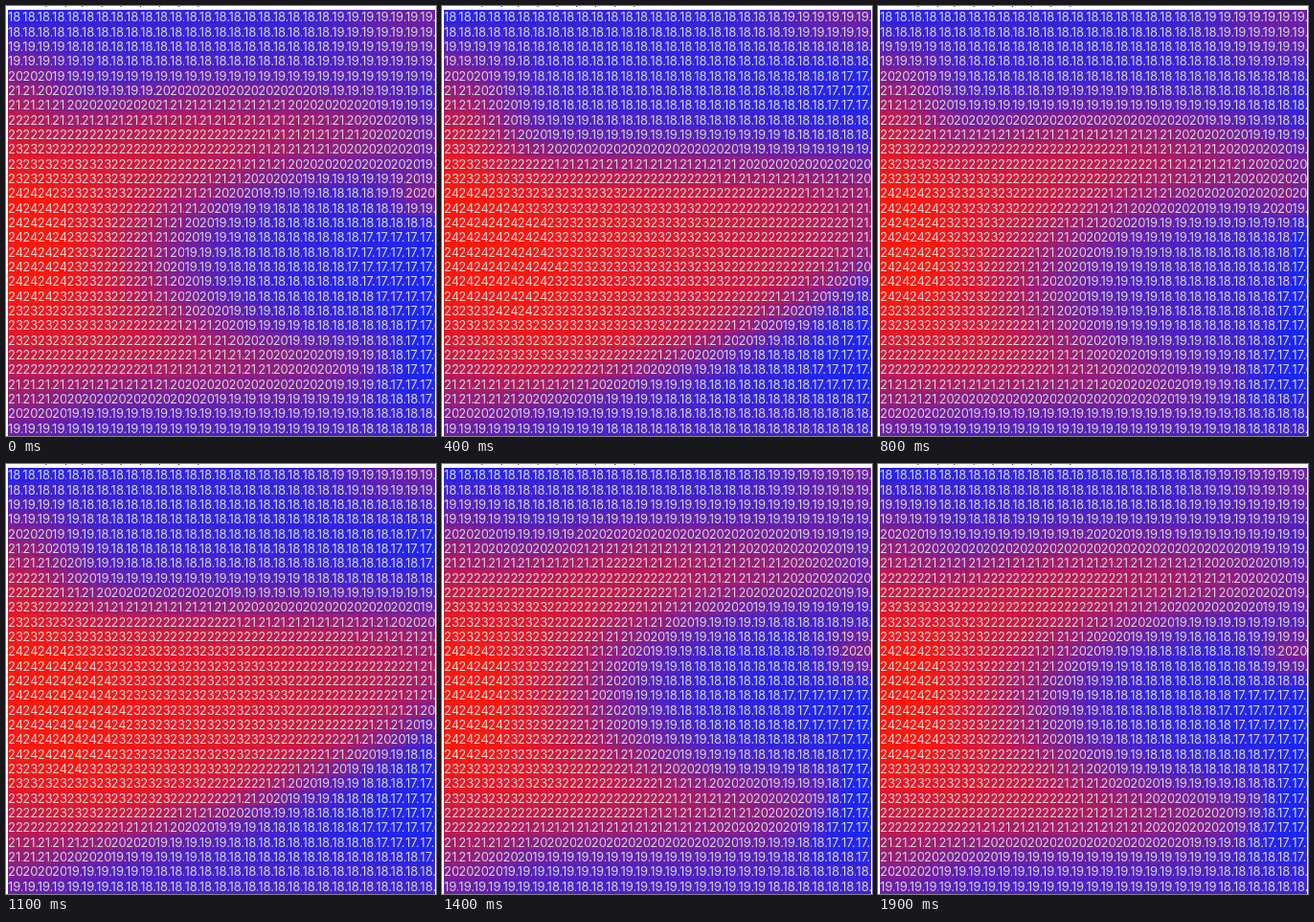
These frames come from a looping animation (449 by 449 pixels, 2 s). An HTML page with a canvas:

```html
<!DOCTYPE html>
<html lang="en">
<head>
<meta charset="utf-8">
<title>Temperature field</title>
<style>
  html, body { margin: 0; width: 100%; height: 100%; overflow: hidden; background: #fff; }
  canvas { display: block; width: 449px; height: 449px; }
</style>
</head>
<body>
<canvas id="stage" width="449" height="449"></canvas>
<script>
const ctx = document.getElementById('stage').getContext('2d');
const LOOP = 2000, STEP = 100, CELLS = 29, LAST = CELLS - 1;
const LEFT = 2, TOP = 4, CELL_W = 15.37, CELL_H = 15.33;

const mix = (a, b, t) => a + (b - a) * t;
const clamp = (v, low, high) => Math.min(high, Math.max(low, v));
const edge = x => 1 / (1 + Math.exp(-x));
const bell = x => Math.exp(-x * x);

// split: how far a cold pocket parts the plume; lift: how far the flow has risen.
function flowAt(time) {
  const turn = 2 * Math.PI / LOOP;
  return {
    split: clamp(0.5 + 1.1 * Math.cos(3 * turn * time), 0, 1),
    lift: (0.5 + 0.5 * Math.cos(turn * (time - 1600))) ** 2
  };
}

function temperature(col, row, { split, lift }) {
  const u = col / LAST;

  // Cool surroundings with warmer corners on the right.
  const corner = 2.3 * bell((LAST - col) / 6.5) * bell(row / mix(2.6, 5, split));
  const ambient = 18.4 - 0.8 * u ** 3 + corner + u * bell((LAST - row) / 2);

  // Warm plume between an upper and a lower edge.
  const upper = 9.6 - 3 * lift - 3.2 * split * Math.sin(Math.PI * col / 32);
  const lower = 25.8 - 3 * lift * (1 - 0.6 * split)
    - mix(8, 13, split) * u ** mix(2, 16, split);
  const plume = edge((row - upper) / 1.2) * edge((lower - row) / 1.1);
  const heat = 6 - 1.7 * u - 0.7 * split;

  // Cold pocket entering from the right.
  const pocketRow = 18.5 - 4.5 * lift;
  const reach = Math.hypot((col - 25) / 14.5, (row - pocketRow) / 6.3);
  const pocket = split * edge((1 - reach) / 0.17);

  const returning = 3 * split * bell((LAST - col) / 3) * bell((row - 12) / 1.8);
  const inside = ambient + heat * plume * (1 - pocket) + returning * pocket;
  const wall = 18 + 6.6 * Math.sin(Math.PI * row / 31);
  return clamp(mix(inside, wall, bell(col / 4.5)), 17.1, 24.9);
}

function cellColor(value) {
  const t = clamp((value - 17.4) / 6.8, 0, 1);
  return `rgb(${mix(20, 255, t)}, ${mix(38, 22, t)}, ${mix(255, 16, t)})`;
}

function drawCell(col, row, value) {
  const x = LEFT + col * CELL_W, y = TOP + row * CELL_H;
  const left = Math.round(x), top = Math.round(y);
  const width = Math.round(x + CELL_W) - left, height = Math.round(y + CELL_H) - top;
  ctx.save();
  ctx.beginPath();
  ctx.rect(left, top, width, height);
  ctx.clip();
  ctx.fillStyle = cellColor(value);
  ctx.fillRect(left, top, width, height);
  ctx.fillStyle = '#d3d3d3';
  ctx.fillText(String(Math.round(value * 100) / 100), x, y + 12.4);
  ctx.restore();
}

function draw(time) {
  ctx.fillStyle = '#fff';
  ctx.fillRect(0, 0, 449, 449);
  ctx.font = '13px Inter, sans-serif';
  ctx.fillStyle = '#222';
  ctx.fillText('(0, 0), (1, 0), (2, 0), (3, 0), (4, 0)', 28, -1);

  const flow = flowAt(time);
  for (let row = 0; row < CELLS; row++) {
    for (let col = 0; col < CELLS; col++) {
      drawCell(col, row, temperature(col, row, flow));
    }
  }
}

const start = performance.now();
let shown = -1;
function tick() {
  const elapsed = (performance.now() - start) % LOOP;
  const time = Math.floor(elapsed / STEP) * STEP;
  if (time !== shown) draw(shown = time);
  requestAnimationFrame(tick);
}
tick();
</script>
</body>
</html>
```
